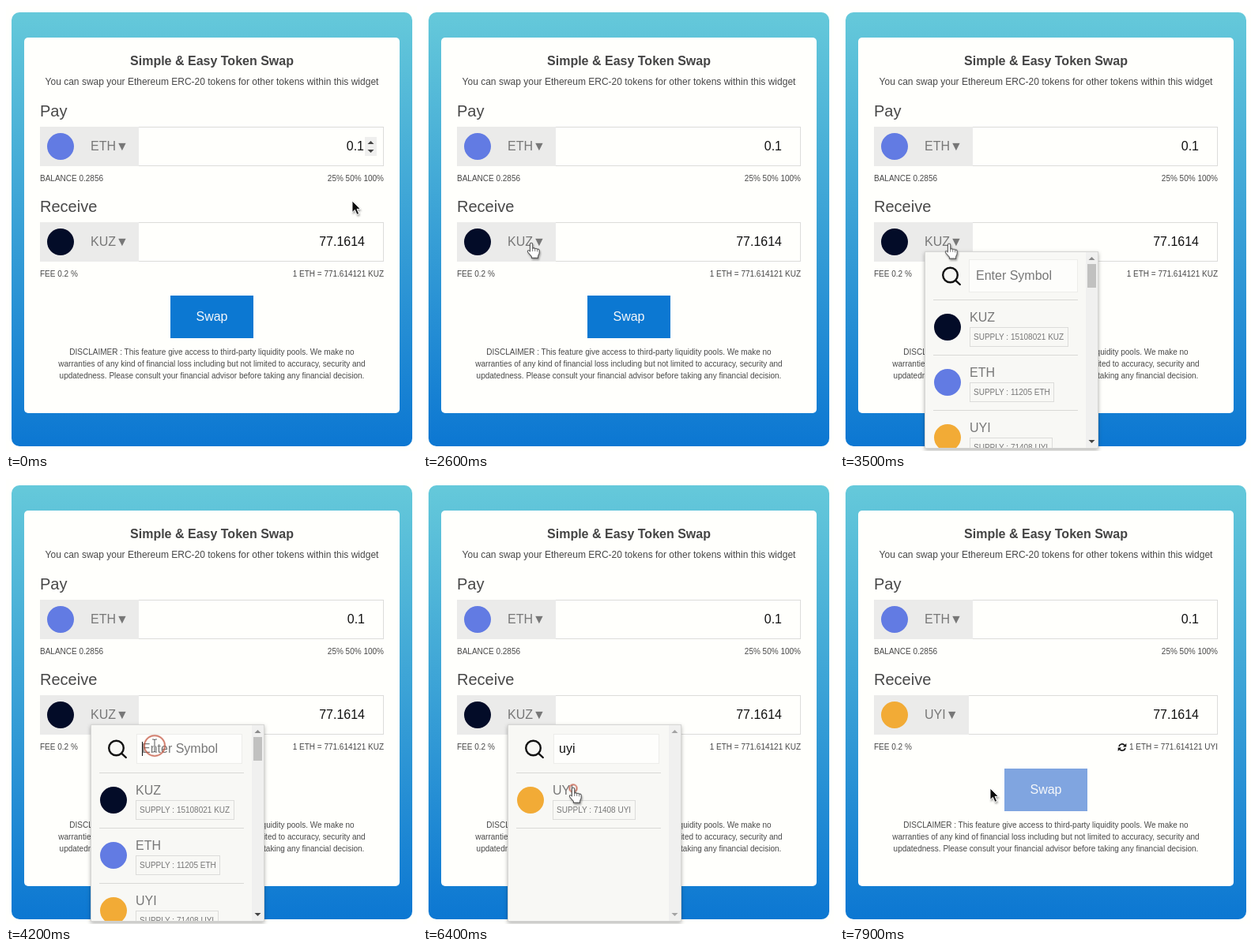
Animation, 520 px wide and 564 px high, one loop 8000 ms. Source, as an HTML page:

```html
<!DOCTYPE html>
<html lang="en">
<head>
<meta charset="utf-8">
<title>Token swap widget</title>
<style>
html, body { margin: 0; width: 100%; height: 100%; overflow: hidden; background: #fffffd; }
svg { display: block; width: 520px; height: 564px; font-family: "Liberation Sans", Arial, sans-serif; }
.mid { text-anchor: middle; }
.end { text-anchor: end; }
.small { font-size: 10px; fill: #484848; }
.head { font-size: 20px; fill: #484848; }
.sym { font-size: 16px; fill: #777; }
.num { font-size: 16px; fill: #111; }
.supply { font-size: 10px; fill: #777; }
.line { stroke: #d9d9d6; }
.frame { fill: none; stroke: #dcdcda; }
.eth { fill: #627be3; }
.kuz { fill: #030c28; }
.uyi { fill: #f2ab36; }

/* One shared 8 s clock; hard changes use step-end */
.step { opacity: 0; animation: 8s step-end infinite; }
.spin { animation-name: spin; }
.nudge { animation: nudge 8s step-end infinite; }
.before { animation-name: before; }
.after { animation-name: after; }
.drop { animation-name: drop; }
.all { animation-name: all; }
.found { animation-name: found; }
.blur { animation-name: blur; }
.focus { animation-name: focus; }
.caret1 { animation-name: caret1; }
.caret2 { animation-name: caret2; }
.arrow { animation-name: arrow; }
.beam { animation-name: beam; }
.hand { animation-name: hand; }
.pointer { animation: move 8s ease-in-out infinite; }
.ring { animation: ring 8s linear infinite; }
.sync { animation: turn 1.33333s linear -.1s infinite; }

@keyframes spin { 0% { opacity: 1 } 1% { opacity: 0 } }
@keyframes nudge { 0% { transform: translateX(-1px) } 1% { transform: none } }
@keyframes before { 0% { opacity: 1 } 84.6% { opacity: 0 } }
@keyframes after { 0% { opacity: 0 } 84.6%, 100% { opacity: 1 } }
@keyframes drop { 0% { opacity: 0 } 34.7% { opacity: 1 } 84.6% { opacity: 0 } }
@keyframes all { 0% { opacity: 1 } 63.4% { opacity: 0 } }
@keyframes found { 0% { opacity: 0 } 63.4%, 100% { opacity: 1 } }
@keyframes blur { 0% { opacity: 1 } 50.7% { opacity: 0 } }
@keyframes focus { 0% { opacity: 0 } 50.7%, 100% { opacity: 1 } }
@keyframes caret1 { 0% { opacity: 0 } 50.7% { opacity: 1 } 57.2% { opacity: 0 } }
@keyframes caret2 { 0% { opacity: 0 } 63.4% { opacity: 1 } 70.9% { opacity: 0 } }
@keyframes arrow {
  0% { opacity: 1 } 21.1% { opacity: 0 } 46% { opacity: 1 } 47% { opacity: 0 }
  88.5%, 100% { opacity: 1 }
}
@keyframes beam {
  0% { opacity: 0 } 21.1% { opacity: 1 } 24.5% { opacity: 0 }
  47% { opacity: 1 } 75.6% { opacity: 0 }
}
@keyframes hand {
  0% { opacity: 0 } 24.5% { opacity: 1 } 46% { opacity: 0 }
  75.6% { opacity: 1 } 88.5% { opacity: 0 }
}
@keyframes move {
  0%, 14.4% { transform: translate(438px, 247px) }
  27.5%, 43% { transform: translate(137px, 301px) }
  50.5%, 74.4% { transform: translate(188px, 338px) }
  76.9%, 100% { transform: translate(190px, 392px) }
}
@keyframes ring {
  0%, 32.99% { transform: scale(0); opacity: 0 }
  33% { transform: scale(1); opacity: 1 }
  39.3% { transform: scale(.03); opacity: 1 }
  39.4%, 50.69% { transform: scale(0); opacity: 0 }
  50.7% { transform: scale(1); opacity: 1 }
  57% { transform: scale(.03); opacity: 1 }
  57.1%, 75.59% { transform: scale(0); opacity: 0 }
  75.6% { transform: scale(1); opacity: 1 }
  81.4% { transform: scale(.03); opacity: 1 }
  81.5%, 100% { transform: scale(0); opacity: 0 }
}
@keyframes turn { to { transform: rotate(360deg) } }
</style>
</head>
<body>
<svg viewBox="0 0 520 564">
  <defs>
    <linearGradient id="sky" x1="0" y1="0" x2="0" y2="1">
      <stop offset="0" stop-color="#65c9da"/>
      <stop offset="1" stop-color="#0c77d2"/>
    </linearGradient>
    <filter id="shade" x="-10%" y="-10%" width="120%" height="120%">
      <feDropShadow dx="0" dy="2" stdDeviation="2.5" flood-opacity=".3"/>
    </filter>
    <filter id="soft" x="-50%" y="-50%" width="220%" height="220%">
      <feDropShadow dx="1" dy="2" stdDeviation="1" flood-opacity=".35"/>
    </filter>
    <clipPath id="pane"><rect x="108" y="312" width="203" height="248"/></clipPath>
    <g id="uyiRow">
      <circle class="uyi" cx="136" cy="407" r="17"/>
      <text class="sym" x="164" y="400">UYI</text>
      <rect class="frame" x="164.5" y="407.5" width="104" height="24"/>
      <text class="supply" x="169" y="423">SUPPLY : 71408 UYI</text>
      <path class="line" d="M118 442.5H301"/>
    </g>
  </defs>

  <rect x="7" y="8" width="507" height="550" rx="10" fill="url(#sky)"/>
  <rect x="23" y="40" width="475" height="476" rx="5" fill="#fffffc"/>
  <text class="mid" x="260.5" y="75" font-size="16" font-weight="700" fill="#444">Simple &amp; Easy Token Swap</text>
  <text class="mid" x="260.5" y="100" font-size="12" fill="#484848">You can swap your Ethereum ERC-20 tokens for other tokens within this widget</text>

  <text class="head" x="43" y="140">Pay</text>
  <rect class="frame" x="43.5" y="153.5" width="434" height="49"/>
  <path fill="#ebebea" d="M43 153h125v50H43z"/>
  <circle class="eth" cx="69" cy="178" r="17"/>
  <text class="sym" x="107" y="183">ETH▼</text>
  <text class="num end nudge" x="454" y="183">0.1</text>
  <g class="step spin">
    <path fill="#efefee" d="M454 166h15v24h-15z"/>
    <path fill="#444" d="M457.5 175l4-4 4 4zM457.5 182l4 4 4-4z"/>
  </g>
  <text class="small" x="43" y="222">BALANCE 0.2856</text>
  <text class="small end" x="478" y="222">25% 50% 100%</text>

  <text class="head" x="43" y="261">Receive</text>
  <rect class="frame" x="43.5" y="274.5" width="434" height="49"/>
  <text class="num end" x="454" y="304">77.1614</text>
  <text class="small" x="43" y="343">FEE 0.2 %</text>

  <g class="step before">
    <path fill="#ebebea" d="M43 274h125v50H43z"/>
    <circle class="kuz" cx="69" cy="299" r="17"/>
    <text class="sym" x="107" y="304">KUZ▼</text>
    <text class="small end" x="478" y="343">1 ETH = 771.614121 KUZ</text>
    <path fill="#0c78d2" d="M208 367h105v54H208z"/>
  </g>
  <g class="step after">
    <path fill="#ebebea" d="M43 274h120v50H43z"/>
    <circle class="uyi" cx="69" cy="299" r="17"/>
    <text class="sym" x="107" y="304">UYI▼</text>
    <text class="small end" x="478" y="343">1 ETH = 771.614121 UYI</text>
    <path fill="#80a5e0" d="M208 367h105v54H208z"/>
    <g transform="translate(357 340)">
      <g class="sync">
        <path fill="none" stroke="#111" stroke-width="1.7" d="M-4-1A4 4 0 0 1 3-2.6M4 1A4 4 0 0 1-3 2.6"/>
        <path fill="#111" d="M5.3-5V-.6H.9zM-5.3 5V.6H-.9z"/>
      </g>
    </g>
  </g>
  <text class="mid" x="260.5" y="399" font-size="16" fill="#f6f8fa">Swap</text>

  <g class="small mid">
    <text x="260.5" y="442">DISCLAIMER : This feature give access to third-party liquidity pools. We make no</text>
    <text x="260.5" y="457">warranties of any kind of financial loss including but not limited to accuracy, security and</text>
    <text x="260.5" y="472">updatedness. Please consult your financial advisor before taking any financial decision.</text>
  </g>

  <g class="step drop">
    <rect x="107.5" y="311.5" width="219" height="249" fill="#f8f8f5" stroke="#d6d6d4" filter="url(#shade)"/>
    <path fill="#f0f0ef" d="M311 312h15v248h-15z"/>
    <g fill="none" stroke="#111" stroke-width="2.4" stroke-linecap="round">
      <circle cx="139.5" cy="341" r="9.3"/>
      <path d="M146.3 347.8l5.5 5.2"/>
    </g>
    <rect class="step blur" x="163.5" y="321.5" width="137" height="41" fill="#fdfdfb" stroke="#ededea"/>
    <rect class="step focus" x="165.5" y="323.5" width="133" height="37" fill="#fefefc" stroke="#ededea"/>
    <path class="line" d="M118 372.5H301"/>

    <g class="step all">
      <text class="sym" x="172" y="347">Enter Symbol</text>
      <path fill="#c1c1c0" d="M313 327h11v30h-11z"/>
      <path fill="#8a8a8a" d="M314.5 322l4-4 4 4z"/>
      <path fill="#444" d="M314.5 550l4 4 4-4z"/>
      <g clip-path="url(#pane)">
        <circle class="kuz" cx="136" cy="407" r="17"/>
        <text class="sym" x="164" y="400">KUZ</text>
        <rect class="frame" x="164.5" y="407.5" width="124" height="24"/>
        <text class="supply" x="169" y="423">SUPPLY : 15108021 KUZ</text>
        <path class="line" d="M118 442.5H301"/>
        <circle class="eth" cx="136" cy="477" r="17"/>
        <text class="sym" x="164" y="470">ETH</text>
        <rect class="frame" x="164.5" y="477.5" width="106" height="24"/>
        <text class="supply" x="169" y="493">SUPPLY : 11205 ETH</text>
        <path class="line" d="M118 512.5H301"/>
        <use href="#uyiRow" y="140"/>
      </g>
    </g>
    <g class="step found">
      <text class="num" x="172" y="347">uyi</text>
      <path fill="#a3a3a3" d="M314.5 322l4-4 4 4zM314.5 550l4 4 4-4z"/>
      <use href="#uyiRow"/>
    </g>
    <path class="step caret1" stroke="#111" d="M172.5 333v18"/>
    <path class="step caret2" stroke="#111" d="M193.5 333v17"/>
  </g>

  <g class="pointer">
    <circle class="ring" r="18" fill="none" stroke="#c2523c" stroke-width="1.5" vector-effect="non-scaling-stroke"/>
    <path class="step arrow" filter="url(#soft)" fill="#111" stroke="#fff" stroke-width=".9"
      d="M0 0V14.5L3.4 11.4 6 17.4 8.6 16.2 6 10.4H10.4z"/>
    <g class="step beam" fill="none">
      <path stroke="#fff" stroke-width="2.6" opacity=".8" d="M-3-8H-1L0-7 1-8H3M0-7V7M-3 8H-1L0 7 1 8H3"/>
      <path stroke="#666" stroke-width="1.1" d="M-3-8H-1L0-7 1-8H3M0-7V7M-3 8H-1L0 7 1 8H3"/>
    </g>
    <g class="step hand" filter="url(#soft)" stroke="#555" stroke-width="1.1" stroke-linejoin="round">
      <path fill="#fff" d="M-1.6 10V1Q-1.6-.8 0-.8T1.7 1V6.2Q3.3 5 4.7 6.6 6.3 5.6 7.6 7.3 10.2 6.6 10.2 9.4V12.4L8.6 16V18.4H.4V16.6L-4.4 11Q-5.2 9.2-3.8 8.7-2.7 8.5-1.6 10z"/>
      <path fill="none" stroke-width=".8" d="M1.7 6.2V10M4.7 6.8V10M7.6 7.5V10.4"/>
    </g>
  </g>
</svg>
</body>
</html>
```
